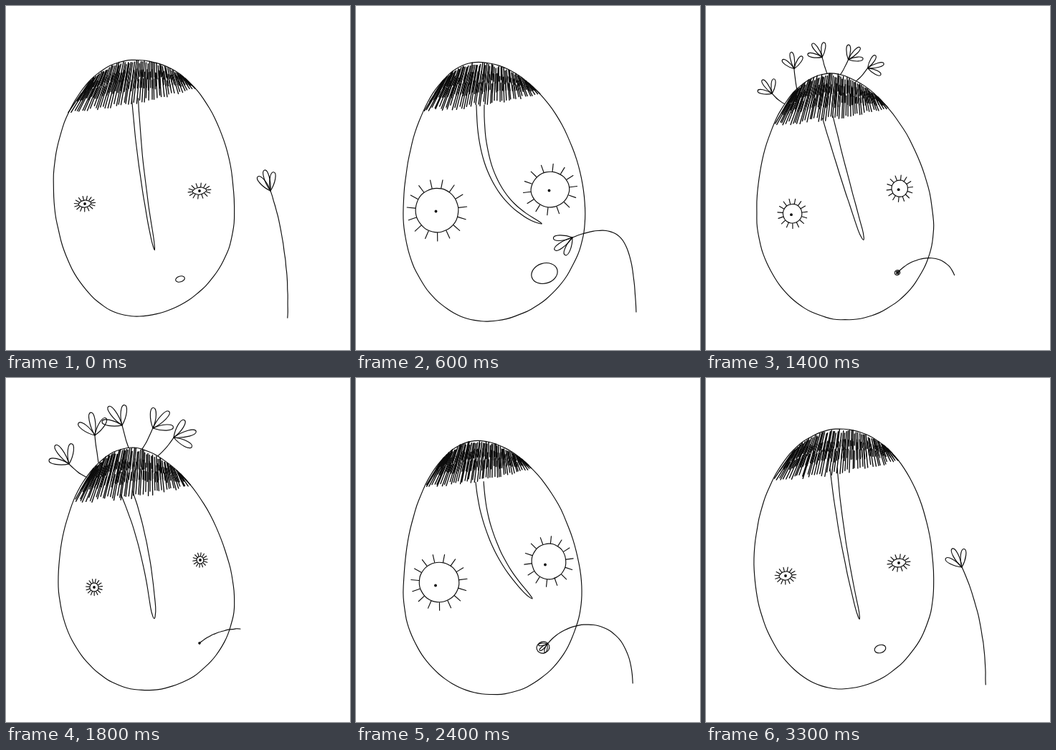
Recreate the animation shown at these times as an HTML page with a canvas. Size 480 by 480 pixels, loop 3.4 s.

```html
<!DOCTYPE html>
<html lang="en">
<head>
<meta charset="utf-8">
<title>Flower eater</title>
<style>
html, body { margin: 0; width: 100%; height: 100%; overflow: hidden; background: #fff; }
canvas { display: block; width: 480px; height: 480px; }
</style>
</head>
<body>
<canvas id="stage" width="480" height="480"></canvas>
<script>
const ctx = document.getElementById('stage').getContext('2d');
const STEP = 100, COUNT = 34;

// face: top, right, bottom and left points, roundness of the upper right
// hem: y of both hair ends; nose: quadratic curve, half width; stem: cubic curve
// eyes: centre, radii; flower: angle, spread, length
const poses = [
  { at: 0, face: [180,75, 319,290, 180,433, 66,250, 2.1], hem: [147,115],
    nose: [180,129, 187,238, 208,344, 4.5],
    left: [110,276, 9,5], right: [270,258, 10,5], gaze: [0,0], mouth: [243,381, 6.5,4],
    stem: [369,258, 387,310, 395,375, 393,435], flower: [-1.85, .45, 28] },
  { at: 1, face: [186,71, 318,290, 187,434, 67,260, 2.1], hem: [142,115],
    nose: [178,126, 188,230, 215,340, 5],
    left: [111,276, 9,6], right: [269,258, 10,6], gaze: [0,0], mouth: [243,378, 8,5.5],
    stem: [357,264, 376,305, 391,360, 390,428], flower: [-2.05, .6, 27] },
  { at: 6, face: [171,78, 320,290, 180,440, 66,290, 1.87], hem: [145,122],
    nose: [173.5,138, 172,270, 262,305, 5.5],
    left: [113,285, 30,31], right: [271,256, 27,25], gaze: [-1.5,1.5], mouth: [263,373, 18.5,14],
    stem: [302,323, 372,296, 386,322, 391,427], flower: [-3.75, .57, 28] },
  { at: 10, face: [170,87, 315,297, 192,442, 66,300, 1.8], hem: [151,126],
    nose: [172.5,145, 180,245, 248,310, 5.5],
    left: [116,285, 28,28], right: [269,256, 24,25], gaze: [-5,4.5], mouth: [261,376, 9,8],
    stem: [267,371, 300,330, 384,326, 386,426], flower: [-3.85, .6, 13] },
  { at: 16, face: [177,97, 319,310, 195,436, 73,285, 1.7], hem: [172,150],
    nose: [168.5,160, 198,235, 207,339, 8.5],
    left: [123,292, 6,6], right: [271,254, 5,5], gaze: [0,0], mouth: [270,370, 1.2,1.2],
    stem: [270,370, 285,357, 308,349, 327,350], flower: [-3.85, .6, 0] }
];

// Root x, node x and y, angle of the petals
const sprouts = [[112, 88,120, -2.2], [129, 124,80, -1.75], [171, 162,66, -2.2],
                 [190, 205,70, -.8], [212, 234,83, -.27]];

const mix = (a, b, k) => a + (b - a) * k;
const round = (t, p) => Math.pow(Math.max(0, 1 - Math.pow(t, p)), 1 / p);
let rnd;

function random(seed) {
  let s = seed * 7919 + 17;
  return () => (s = (s * 16807) % 2147483647) / 2147483647;
}

function poseAt(n) {
  let i = 0;
  while (i < poses.length - 2 && n >= poses[i + 1].at) i++;
  const a = poses[i], b = poses[i + 1];
  const k = Math.min(1, (n - a.at) / (b.at - a.at));
  const out = {};
  for (const part in a) if (part !== 'at') out[part] = a[part].map((v, j) => mix(v, b[part][j], k));
  return out;
}

// Point on a Bezier curve given as a flat list of coordinates
function bezier(list, t) {
  if (list.length === 2) return list;
  return bezier(list.slice(2).map((v, i) => mix(list[i], v, t)), t);
}

// Smooth line through count points of fn(0..1), with a slightly unsteady hand
function trace(fn, count, closed, shake = .5) {
  const pts = Array.from({ length: count }, (_, i) =>
    fn(i / (closed ? count : count - 1)).map(v => v + (rnd() - .5) * shake));
  const mid = (a, b) => [(a[0] + b[0]) / 2, (a[1] + b[1]) / 2];
  ctx.beginPath();
  if (closed) {
    ctx.moveTo(...mid(pts[count - 1], pts[0]));
    pts.forEach((p, i) => ctx.quadraticCurveTo(...p, ...mid(p, pts[(i + 1) % count])));
  } else {
    ctx.moveTo(...pts[0]);
    for (let i = 1; i < count - 1; i++) ctx.quadraticCurveTo(...pts[i], ...mid(pts[i], pts[i + 1]));
    ctx.lineTo(...pts[count - 1]);
  }
  ctx.stroke();
}

// Four elliptical quarters between the outermost points
function facePoint([tx, ty, rx, ry, bx, by, lx, ly, p], u) {
  const a = u * Math.PI * 2, c = Math.cos(a), s = Math.sin(a);
  const [sx, sy] = c > 0 ? [rx, ry] : [lx, ly];
  const [ex, ey] = s > 0 ? [bx, by] : [tx, ty];
  const pow = 2 / (c > 0 && s < 0 ? p : 2);
  return [mix(ex, sx, Math.abs(c) ** pow), mix(sy, ey, Math.abs(s) ** pow)];
}

function crownY([tx, ty, rx, ry, , , lx, ly, p], x) {
  return x < tx ? mix(ly, ty, round((tx - x) / (tx - lx), 2))
                : mix(ry, ty, round((x - tx) / (rx - tx), p));
}

function sideX([tx, ty, rx, ry, , , lx, ly, p], y, isLeft) {
  return isLeft ? mix(tx, lx, round((ly - y) / (ly - ty), 2))
                : mix(tx, rx, round((ry - y) / (ry - ty), p));
}

function nose(list) {
  const path = list.slice(0, 6), w = list[6];
  trace(u => {
    const side = u < .5 ? -1 : 1, t = 1 - Math.abs(2 * u - 1);
    const [x, y] = bezier(path, t), [nx, ny] = bezier(path, t + .01);
    const len = Math.hypot(nx - x, ny - y), off = side * w * (1 - .65 * t) * (t < 1 ? 1 : 0);
    return [x + (ny - y) / len * -off * -1, y - (nx - x) / len * off];
  }, 33, false, .4);
}

function eye([cx, cy, rx, ry], gaze, count) {
  const pinch = Math.max(0, 1 - ry / rx), tilt = -.12;
  const lash = 4 + (rx + ry) * .13;
  const turn = (x, y) => [cx + x * Math.cos(tilt) - y * Math.sin(tilt),
                          cy + x * Math.sin(tilt) + y * Math.cos(tilt)];
  trace(u => {
    const a = u * Math.PI * 2, s = Math.sin(a);
    return turn(rx * Math.cos(a), ry * s * Math.abs(s) ** pinch);
  }, 28, true);
  ctx.beginPath();
  for (let i = 0; i < count; i++) {
    const a = i / count * Math.PI * 2, c = Math.cos(a), s = Math.sin(a);
    ctx.moveTo(...turn((rx + .5) * c, (ry + .5) * s));
    ctx.lineTo(...turn((rx + lash) * c, (ry + lash) * s));
  }
  ctx.stroke();
  ctx.beginPath();
  ctx.arc(cx + gaze[0], cy + gaze[1], 1.9, 0, 7);
  ctx.fill();
}

function mouth([x, y, rx, ry]) {
  ctx.beginPath();
  ctx.ellipse(x, y, rx, ry, -.3, 0, 7);
  if (rx < 2) ctx.fill();
  ctx.stroke();
}

function flower(x, y, angle, spread, len) {
  for (const side of [-1, 0, 1]) {
    ctx.save();
    ctx.translate(x, y);
    ctx.rotate(angle + side * spread);
    const l = len * (side ? .95 : 1.08), w = len * .18;
    ctx.beginPath();
    ctx.moveTo(0, 0);
    ctx.bezierCurveTo(l * .45, w, l, w, l, 0);
    ctx.bezierCurveTo(l, -w, l * .45, -w, 0, 0);
    ctx.stroke();
    ctx.restore();
  }
}

function sprout([rootX, nodeX, nodeY, angle], face, g) {
  const dx = face[0] - poses[4].face[0], dy = face[1] - poses[4].face[1];
  const x = rootX + dx, y = crownY(face, x);
  const nx = mix(x, nodeX + dx, g), ny = mix(y, nodeY + dy, g);
  trace(u => [mix(x, nx, u), mix(y, ny, u) + Math.sin(u * Math.PI) * 2 * g], 6);
  flower(nx, ny, angle, .75, 30 * g);
}

function hair(face, [leftY, rightY]) {
  const lx = sideX(face, leftY, true), rx = sideX(face, rightY, false);
  const layer = (count, from, to, width) => {
    ctx.lineWidth = width;
    ctx.beginPath();
    for (let i = 0; i < count; i++) {
      const u = Math.min(1, (i + rnd() * .6) / (count - .6));
      const topX = mix(lx, rx, mix(.17, .91, u)), topY = crownY(face, topX);
      const endX = mix(lx, rx, u), endY = mix(leftY, rightY, u) + Math.sin(u * Math.PI) * 4;
      const a = from + rnd() * .1, b = to - rnd() * .12;
      ctx.moveTo(mix(topX, endX, a), mix(topY, endY, a));
      ctx.lineTo(mix(topX, endX, b), mix(topY, endY, b));
    }
    ctx.stroke();
  };
  layer(58, 0, .5, 1.5);
  layer(54, .2, .76, 1.4);
  layer(50, .42, 1.05, 1.4);
}

function draw(n) {
  const p = poseAt(n);
  rnd = random(n + 1);
  ctx.fillStyle = '#fff';
  ctx.fillRect(0, 0, 480, 480);
  ctx.fillStyle = ctx.strokeStyle = '#0c0c0c';
  ctx.lineCap = ctx.lineJoin = 'round';
  ctx.lineWidth = 1.15;

  trace(u => facePoint(p.face, u), 72, true, .8);
  nose(p.nose);
  eye(p.left, p.gaze, 15);
  eye(p.right, p.gaze, 14);
  mouth(p.mouth);
  trace(u => bezier(p.stem, u), 24);
  flower(p.stem[0], p.stem[1], ...p.flower);
  if (n > 10) {
    const g = Math.min(1, (n - 10) / 6) ** .8;
    sprouts.forEach(s => sprout(s, p.face, g));
  }
  hair(p.face, p.hem);
}

let shown = -1;
function tick() {
  const i = Math.floor(performance.now() / STEP) % COUNT;
  const n = Math.min(i, COUNT - i);
  if (n !== shown) draw(shown = n);
  requestAnimationFrame(tick);
}
tick();
</script>
</body>
</html>
```
